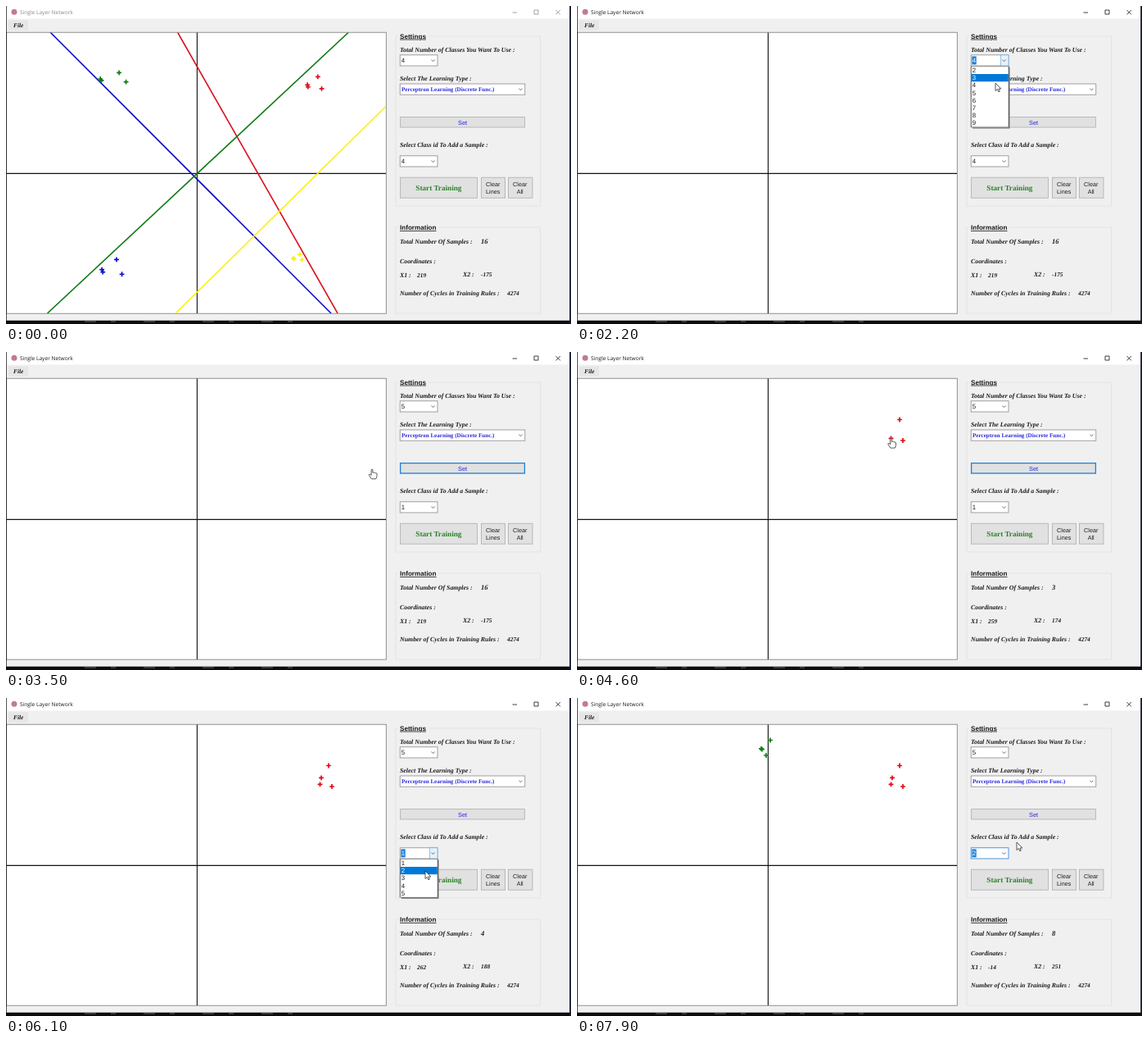
Animation of 690x388 px, one loop 8 s. Source, as an HTML page:

```html
<!DOCTYPE html>
<html lang="en">
<head>
<meta charset="utf-8">
<title>Single Layer Network</title>
<style>
  html, body { margin: 0; width: 100%; height: 100%; overflow: hidden; background: #f0f0f0; }
  svg { display: block; width: 690px; height: 388px; text-rendering: geometricPrecision; }
  text { font: 7.2px "Liberation Sans", sans-serif; fill: #1c1c1c; }
  .label { font: italic bold 7.85px "Liberation Serif", serif; }
  .count { font-size: 8.5px; }
  .small { font-size: 7.4px; }
  .head { font-weight: bold; font-size: 8.1px; text-decoration: underline; }
  .title { font: 6.6px "Open Sans", sans-serif; }
  .digit { font-size: 7.8px; }
  .mid { text-anchor: middle; }
  .rule { font: bold 7.1px "Liberation Serif", serif; fill: #2a2ae0; }
  .set { font-size: 7.4px; fill: #2a2ae0; }
  .start { font: bold 9.2px "Liberation Serif", serif; fill: #2b832b; }
  .on { fill: #fff; }
  .off { fill: #8c8c8c; }
  .box { fill: none; stroke: #dcdcdc; stroke-width: .7; }
</style>
</head>
<body>
<svg viewBox="0 0 690 388">
  <defs>
    <clipPath id="plot"><rect x="1" y="32.5" width="463" height="342.5"/></clipPath>
    <path id="arrow" d="M0 0V9.6L2.3 7.5 3.8 10.8 5.3 10.1 3.9 7H6.9Z"
      fill="#fff" stroke="#222" stroke-width=".75"/>
    <path id="hand" d="M-.9 .7Q0 -.7 .9 .7V4.2Q2.2 3.4 2.7 4.4Q3.8 3.7 4.4 4.7Q5.8 4.4 6 5.8V8.4L4.8 11.8H-.6L-3.7 7.4Q-3.9 5.8 -2.4 6.2L-.9 7.4Z"
      fill="#fff" stroke="#222" stroke-width=".75"/>
  </defs>

  <rect width="690" height="388" fill="#f0f0f0"/>
  <rect width="690" height="15.5" fill="#fff"/>
  <circle cx="10" cy="7.3" r="3.5" fill="#c27a95"/>
  <rect x="3" y="17.5" width="24" height="12" fill="#e6e6e6"/>
  <text class="label small" x="9" y="25.6">File</text>

  <rect x=".7" y="32.2" width="463.6" height="343" fill="#fff" stroke="#777" stroke-width=".8"/>
  <path d="M233.4 32.5V375M1 204.4H464" stroke="#111" stroke-width="1.1"/>

  <rect class="box" x="476" y="37" width="176.5" height="207"/>
  <rect class="box" x="476" y="270" width="176.5" height="105"/>
  <path d="M479 37h37M479 270h49" stroke="#f0f0f0" stroke-width="3"/>
  <text class="head" x="481" y="39.6">Settings</text>
  <text class="head" x="481" y="273">Information</text>

  <text class="label" x="481" y="56.4">Total Number of Classes You Want To Use :</text>
  <text class="label" x="481" y="91.2">Select The Learning Type :</text>
  <text class="label" x="481" y="171.9">Select Class id To Add a Sample :</text>
  <text class="label" x="481" y="289.8">Total Number Of Samples :</text>
  <text class="label" x="481" y="313.6">Coordinates :</text>
  <text class="label" x="481" y="331">X1 :</text>
  <text class="label" x="558" y="330.4">X2 :</text>
  <text class="label" x="481" y="353.4">Number of Cycles in Training Rules :</text>
  <text class="label small" x="612" y="353.4">4274</text>

  <g id="scene"></g>

  <path d="M0 383.7H690V388H0ZM0 0H.7V388H0Z" fill="#0c0c10"/>
  <path d="M688.2 0H690V388H688.2Z" fill="#10182c"/>
  <path d="M96 385h270" stroke="#6d6a48" stroke-dasharray="14 18 6 34"/>
</svg>

<script>
const LOOP = 8000, STEP = 100, ROW = 9.2;
const FOCUS = '#1f80d8';
const scene = document.getElementById('scene');

const text = (x, y, s, cls = '') => `<text x="${x}" y="${y}" class="${cls}">${s}</text>`;
const rect = (x, y, w, h, fill, stroke = 'none', sw = .8) =>
  `<rect x="${x}" y="${y}" width="${w}" height="${h}" fill="${fill}" stroke="${stroke}" stroke-width="${sw}"/>`;
const path = (d, color, w) => `<path d="${d}" fill="none" stroke="${color}" stroke-width="${w}"/>`;
const plus = ([x, y], color) => path(`M${x - 2.9} ${y}h5.8M${x} ${y - 2.9}v5.8`, color, 1.7);

// Samples of a trained class lie on a small ellipse
const ring = (cx, cy, rx, ry) =>
  [3, 5, 7, 9].map(a => [cx + rx * Math.cos(a), cy + ry * Math.sin(a)]);

const trained = [
  { color: '#0d0dcc', line: 'M54 32L397 375', points: ring(131, 320, 14, 11) },
  { color: '#d8101c', line: 'M209.5 32L405 375', points: ring(378, 95, 10, 9) },
  { color: '#0f7a14', line: 'M418.5 32L50.5 375', points: ring(133, 88, 18, 7) },
  { color: '#fbf015', line: 'M465 121.5L207 375', points: ring(357, 307, 6, 4) }
];

// Samples placed one every 200 ms
const clickAll = (from, color, points) =>
  points.map(([x, y], i) => ({ at: from + 200 * i, x, y, color }));
const red = clickAll(4200, '#e00a14', [[394, 82.5], [398, 108], [383.5, 105.3], [385, 97.4]]);
const green = clickAll(6900, '#0a8212', [[236, 51.5], [231, 70], [226, 62.6], [225, 61.8]]);
const clicks = [...red, ...green];

// Pointer stops; it travels straight from one to the next
const stop = (x, y, at, until = at) => ({ x, y, at, until });
const visit = c => stop(c.x, c.y, c.at);
const stops = [
  stop(545, 390, 200),
  stop(627, 223, 800, 1000),
  stop(590.5, 68.5, 1200),
  stop(521, 68, 1800, 1900),
  stop(511, 94, 2200),
  stop(512, 107, 2600, 2800),
  stop(560, 142, 3100, 3200),
  stop(447, 143, 3500),
  stop(red[0].x, red[0].y, 3800),
  ...red.map(visit),
  stop(521, 188, 5500, 5600),
  stop(512, 211, 6100, 6300),
  stop(249, 64, 6700),
  ...green.map(visit),
  stop(green[3].x, green[3].y, 7600),
  stop(537, 176, 7900, LOOP)
];

function pointer(t) {
  const i = stops.findIndex(s => s.until >= t);
  const b = stops[i], a = stops[i - 1];
  if (!a) return null;
  const p = Math.min(1, (t - a.until) / (b.at - a.until));
  return [a.x + (b.x - a.x) * p, a.y + (b.y - a.y) * p];
}

function button(x, y, w, h, focus, hover) {
  return rect(x, y, w, h, hover ? '#e5f1fb' : '#e1e1e1', focus || hover ? FOCUS : '#adadad', focus ? 1.3 : .8);
}

function combo(y, w, { open, focus } = {}) {
  const cx = 481 + w - 5.2, cy = y + 6.6;
  return rect(481.2, y, w, 13.2, '#fff', focus ? FOCUS : '#8a8a8a')
    + (open ? rect(cx - 4, y, 9.4, 13.2, '#e5f1fb', '#6fa8dc', .7) : '')
    + path(`M${cx - 2} ${cy - .9}l2 2 2-2`, '#444', .8);
}

function digit(y, value, selected) {
  return (selected ? rect(482.3, y + 1.6, 5.4, 10, FOCUS) : '')
    + text(482.7, y + 9.3, value, selected ? 'digit on' : 'digit');
}

// Drop-down list that slides out from under its box
function list(top, first, count, age, row) {
  const full = count * ROW + 1;
  const shown = Math.min(full, 6 + age * .24);
  let rows = rect(481.2, 0, 46, full, '#fff', '#333', .8);
  for (let i = 0; i < count; i++) {
    const on = i === row;
    if (on) rows += rect(481.6, i * ROW + .4, 45.2, ROW, '#0078d7');
    rows += text(482.7, i * ROW + 7.7, first + i, on ? 'digit on' : 'digit');
  }
  return rect(483, top + 1, 45.6, shown + .6, '#888')
    + `<svg y="${top}" width="690" height="${shown}"><g transform="translate(0 ${shown - full})">${rows}</g></svg>`;
}

// The highlighted row trails the pointer by one step
function hoverRow(t, top, count, fallback) {
  const row = Math.floor((pointer(t - STEP)[1] - top) / ROW);
  return row < 0 || row >= count ? fallback : row;
}

function titleBar(active) {
  return text(17, 10, 'Single Layer Network', active ? 'title' : 'title off')
    + path('M618.5 8h5.5M645 5h5v5h-5zM671.5 5l5.4 5.4m0-5.4l-5.4 5.4', active ? '#111' : '#8c8c8c', .8);
}

function plot(t) {
  let out = '';
  if (t < 1000) {
    for (const { color, line, points } of trained)
      out += path(line, color, 1.6) + points.map(p => plus(p, color)).join('');
  }
  for (const c of clicks) if (t >= c.at) out += plus([c.x, c.y], c.color);
  return `<g clip-path="url(#plot)">${out}</g>`;
}

function info(t) {
  const done = clicks.filter(c => t >= c.at);
  const { x, y } = done.at(-1) || { x: 360, y: 303 };
  return text(580, 290.3, done.length || 16, 'label count')
    + text(502, 331.4, Math.round((x - 233) * 1.724), 'label small')
    + text(580, 329.8, Math.round((204 - y) * 1.767), 'label small');
}

function controls(t) {
  const between = (a, b) => t >= a && t < b;
  const open1 = between(1900, 2800), open2 = between(5600, 6300);
  const total = t < 2800 ? 4 : 5;
  const id = t < 3200 ? 4 : t < 6300 ? 1 : 2;
  let out = combo(59.8, 45.8, { open: open1 }) + digit(59.8, total, between(1900, 3200))
    + combo(95, 152.6)
    + text(483, 104.2, 'Perceptron Learning (Discrete Func.)', 'rule')
    + button(481.6, 135.6, 151.8, 12.4, between(3200, 5700), between(3000, 3200))
    + text(557.5, 144.7, 'Set', 'mid set')
    + combo(182.8, 45.8, { open: open2, focus: t >= 6300 }) + digit(182.8, id, t >= 5500)
    + button(481.4, 209.2, 94, 25)
    + text(528.4, 224.7, 'Start Training', 'mid start')
    + button(580.4, 209.2, 29.2, 25)
    + text(594.7, 220, 'Clear', 'mid') + text(594.7, 228.6, 'Lines', 'mid')
    + button(613.4, 209.2, 29.6, 25, between(1000, 1900), between(800, 1000))
    + text(627.7, 220, 'Clear', 'mid') + text(627.7, 228.6, 'All', 'mid');
  if (open1) out += list(73.4, 2, 8, t - 1900, hoverRow(t, 73.4, 8, 2));
  if (open2) out += list(196.4, 1, 5, t - 5600, hoverRow(t, 196.4, 5, 0));
  return out;
}

function cursor(t) {
  const p = pointer(t);
  if (!p) return '';
  const overPlot = p[0] < 464 && p[1] > 32 && p[1] < 375;
  return `<use href="#${overPlot ? 'hand' : 'arrow'}" x="${p[0]}" y="${p[1]}"/>`;
}

let last = -1;
function draw() {
  const t = Math.floor(performance.now() % LOOP / STEP) * STEP;
  if (t !== last) {
    last = t;
    scene.innerHTML = titleBar(t >= 1000) + plot(t) + controls(t) + info(t) + cursor(t);
  }
  requestAnimationFrame(draw);
}
draw();
</script>
</body>
</html>
```
